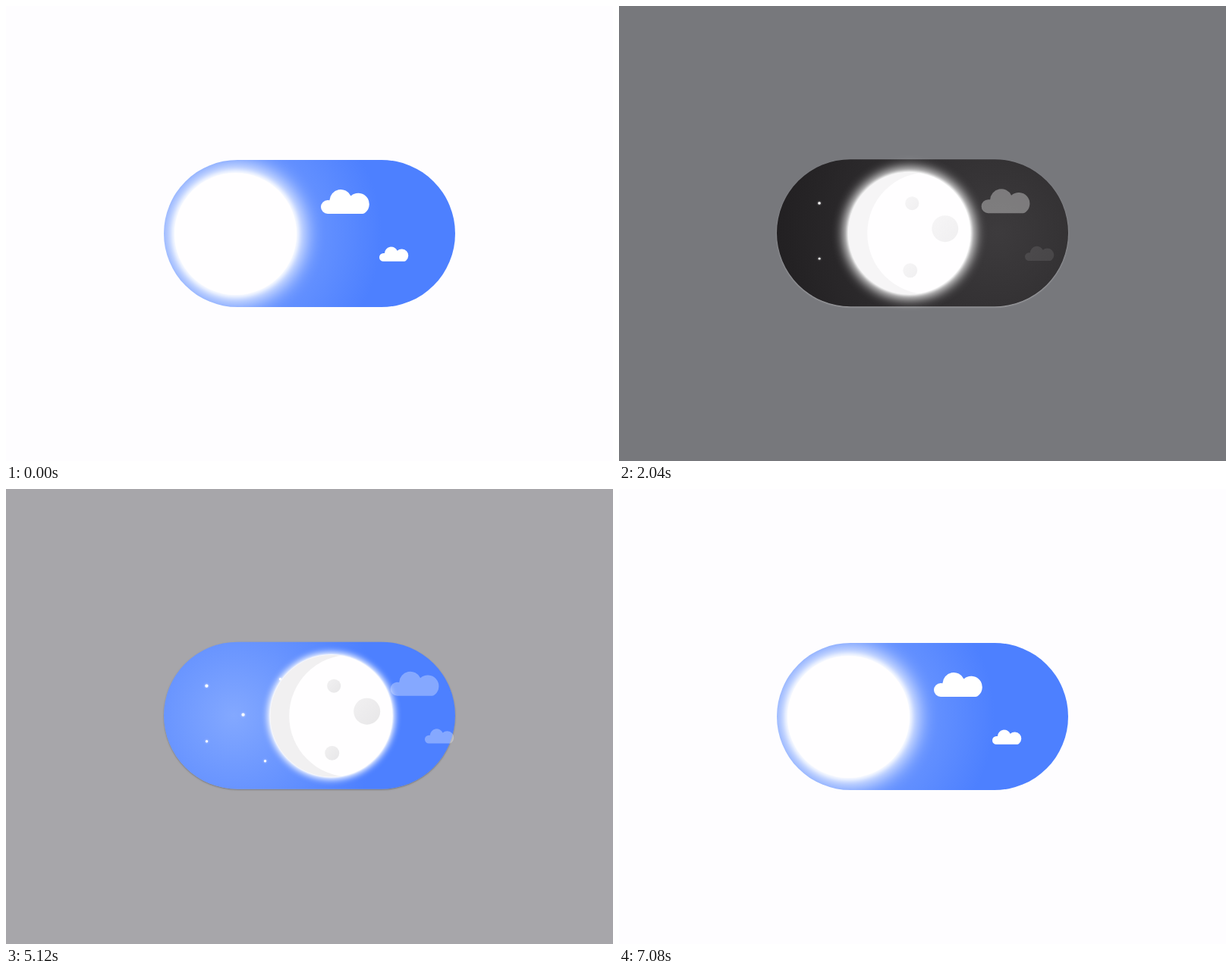
An HTML page that plays this animation: 800x600 px, repeating every 7120 ms.

```html
<!DOCTYPE html>
<html lang="en">
<head>
<meta charset="utf-8">
<title>Day and night switch</title>
<style>
html, body { margin: 0; width: 100%; height: 100%; overflow: hidden; }
#pill, #knob, #shade, .star, .crater, .cloud { position: absolute; }
#pill { left: 208px; top: 203px; width: 384px; height: 194px; border-radius: 97px; }
#knob { left: 14px; top: 16.5px; width: 161px; height: 161px; border-radius: 50%; background: #fffeff; }
#shade { inset: 0; border-radius: 50%; box-shadow: inset 25px 0 #ebe9eb; }
.star, .crater { border-radius: 50%; transform-origin: center; }
.star { background: #fff; box-shadow: 0 0 7px 1px rgba(255, 255, 255, .4); }
.crater { background: linear-gradient(135deg, #eae9ea, #dbdadc); }
.cloud { fill: #fff; overflow: visible; }
</style>
</head>
<body>
<div id="pill">
  <svg class="cloud" style="left:207px;top:38px" width="64" height="33" viewBox="0 0 64 33">
    <path id="puff" d="M9 33A9 9 0 0 1 9 15Q10 15 11.5 15.2A14.7 14.7 0 0 1 39.5 9.5A14.5 14.5 0 0 1 59 31Q57 33 55 33Z"/>
  </svg>
  <svg class="cloud" style="left:284px;top:114px" width="38.4" height="19.8" viewBox="0 0 64 33">
    <use href="#puff"/>
  </svg>
  <div id="knob"><div id="shade"></div></div>
</div>
<script>
const LOOP = 7120, TO_NIGHT = 1926, TO_DAY = 5020;
const DAY = [254, 253, 255], NIGHT = [48, 49, 54];
const SKY = {
  day: 'radial-gradient(circle at 92px 50%, #83a8ff, #4d80ff 195px)',
  night: 'radial-gradient(circle at 290px 50%, #3d3b3d, #222022 290px)'
};
const pill = document.getElementById('pill');
const knob = document.getElementById('knob');
const shade = document.getElementById('shade');
const clouds = document.querySelectorAll('.cloud');

function dot(parent, cls, x, y, r, before) {
  const el = document.createElement('div');
  el.className = cls;
  el.style.cssText = `left:${x - r}px;top:${y - r}px;width:${2 * r}px;height:${2 * r}px`;
  parent.insertBefore(el, before);
  return el;
}

// x, y, radius
const stars = [[60, 58, 4.8], [157, 49, 4], [108, 96, 5], [182, 102, 4.8], [60, 131, 4], [137, 157, 4]]
  .map(s => dot(pill, 'star', ...s, knob));
const craters = [[84, 41, 9], [127.5, 74.5, 17.5], [81, 129.5, 9.5]]
  .map(c => dot(knob, 'crater', ...c, null));

// cubic-bezier(.25, .1, .25, 1)
function ease(x) {
  if (x <= 0) return 0;
  if (x >= 1) return 1;
  const curve = (s, a, b) => 3 * s * (1 - s) ** 2 * a + 3 * s * s * (1 - s) * b + s ** 3;
  let lo = 0, hi = 1;
  for (let i = 0; i < 24; i++) {
    const mid = (lo + hi) / 2;
    if (curve(mid, .25, .25) < x) lo = mid; else hi = mid;
  }
  return curve(lo, .1, 1);
}

// 0 by day, 1 by night
function night(t, out, back = out) {
  return t < TO_DAY ? ease((t - TO_NIGHT) / out) : 1 - ease((t - TO_DAY) / back);
}

const ground = p => `rgb(${DAY.map((c, i) => Math.round(c + (NIGHT[i] - c) * p))})`;

function moveCloud(el, x, opacity) {
  el.style.transform = `translateX(${x}px)`;
  el.style.opacity = opacity;
}

function draw(t) {
  const p = night(t, 450), glow = 1 - p;
  document.body.style.background = ground(night(t, 300));
  pill.style.background = t >= TO_NIGHT && t < TO_DAY ? SKY.night : SKY.day;
  pill.style.boxShadow = `0 1px 2px ${ground(p)}`;
  pill.style.transform = `translateY(${-2 * p}px)`;

  knob.style.transform = `translateX(${193 * p}px)`;
  knob.style.boxShadow = `0 0 ${26 * glow}px ${10 * glow}px #fff, 0 0 ${6 * glow}px ${2 * glow}px #fff`;
  for (const el of [shade, ...craters]) el.style.opacity = p;

  moveCloud(clouds[0], 144 * night(t, 435), 1 - night(t, 300, 480));
  moveCloud(clouds[1], 96 * night(t, 425), 1 - night(t, 180, 480));

  const s = night(t, 500, 300);
  for (const el of stars) el.style.transform = `translateX(${-6 * (1 - s)}px) scale(${s})`;
}

function tick() {
  const t = performance.now() % LOOP;
  draw(Math.floor((t + 4) / 40) * 40);
  requestAnimationFrame(tick);
}
tick();
</script>
</body>
</html>
```
